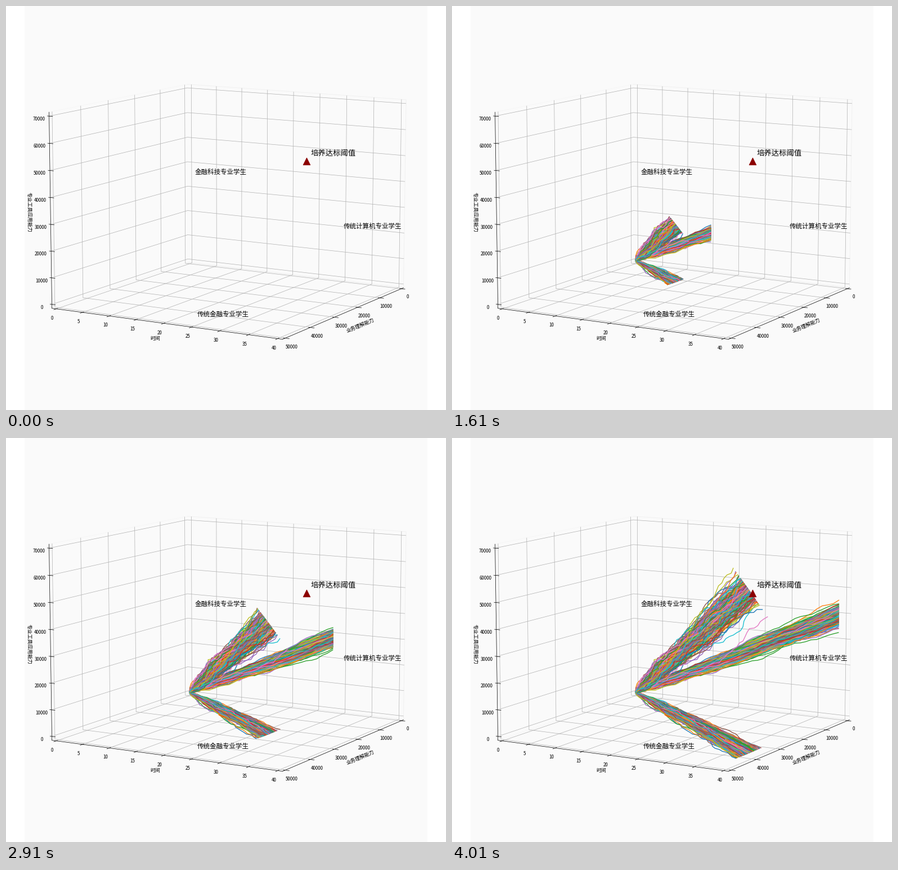
Animation of 782x716 px, one loop 4.11 s. Source, as a matplotlib script:

```python
import numpy as np
import matplotlib.pyplot as plt
from matplotlib.animation import FuncAnimation
from mpl_toolkits.mplot3d.art3d import Line3DCollection

W, H, DPI = 782, 716, 64
LOOP_MS, FRAMES = 4110, 41
STUDENTS, STEPS = 200, 40
MARGIN = 1 / 48

plt.rcParams["font.family"] = "Noto Sans CJK JP"
rng = np.random.default_rng(21)


def growth():
    """Random walks from zero, one row per student."""
    steps = rng.normal(1000, 330, (STUDENTS, STEPS))
    steps[:, 0] = 0
    return steps.cumsum(axis=1)


def paths(business, tools):
    time = np.broadcast_to(np.arange(STEPS), business.shape)
    return np.stack([time, business, tools], axis=-1)


fig = plt.figure(figsize=(W / DPI, H / DPI), dpi=DPI, facecolor="white")
ax = fig.add_axes([0, 0, 1, 1], projection="3d", facecolor="#fafafa",
                  computed_zorder=False)
ax.view_init(elev=10, azim=-60)
ax.set_xlim(0, 40, view_margin=MARGIN)
ax.set_ylim(50000, 0, view_margin=MARGIN)
ax.set_zlim(0, 70000, view_margin=MARGIN)
ax.set_xticks(range(0, 41, 5))
ax.set_yticks(range(0, 50001, 10000))
ax.set_zticks(range(0, 70001, 10000))
ax.tick_params(labelsize=9)
ax.set_xlabel("时间")
ax.set_ylabel("业务理解能力")
ax.set_zlabel("专业工具应用能力")
for axis in (ax.xaxis, ax.yaxis, ax.zaxis):
    axis.pane.set_fill(False)
# the inverted y axis would otherwise push the z axis to the right
ax.zaxis.set_ticks_position("upper")
ax.zaxis.set_label_position("upper")

ax.scatter([40], [40100], [58200], marker="^", s=200, color="darkred",
           depthshade=False, zorder=5)


def label(x, y, text, size=13):
    fig.text(x / W, 1 - y / H, text, size=size, ha="center", va="center")


label(382, 294, "金融科技专业学生")
label(386, 546, "传统金融专业学生")
label(652, 390, "传统计算机专业学生")
label(581.5, 261, "培养达标阈值", 15)

finance, computing, fintech = growth(), growth(), growth()
students = np.concatenate([
    paths(finance, 0 * finance),
    paths(0 * computing, computing),
    paths(fintech, 1.5 * fintech),
])
colors = [f"C{i % 10}" for i in range(len(students))]
lines = Line3DCollection(students[:, :1], colors=colors, linewidths=1.5,
                         capstyle="projecting", joinstyle="round", zorder=2)
ax.add_collection3d(lines)


def update(frame):
    # the empty scene is held for two frames
    step = max(frame - 1, 0)
    lines.set_segments(students[:, :step + 1])
    return [lines]


anim = FuncAnimation(fig, update, frames=FRAMES, interval=LOOP_MS / FRAMES,
                     repeat=True, repeat_delay=0, blit=False)
plt.show()
```
